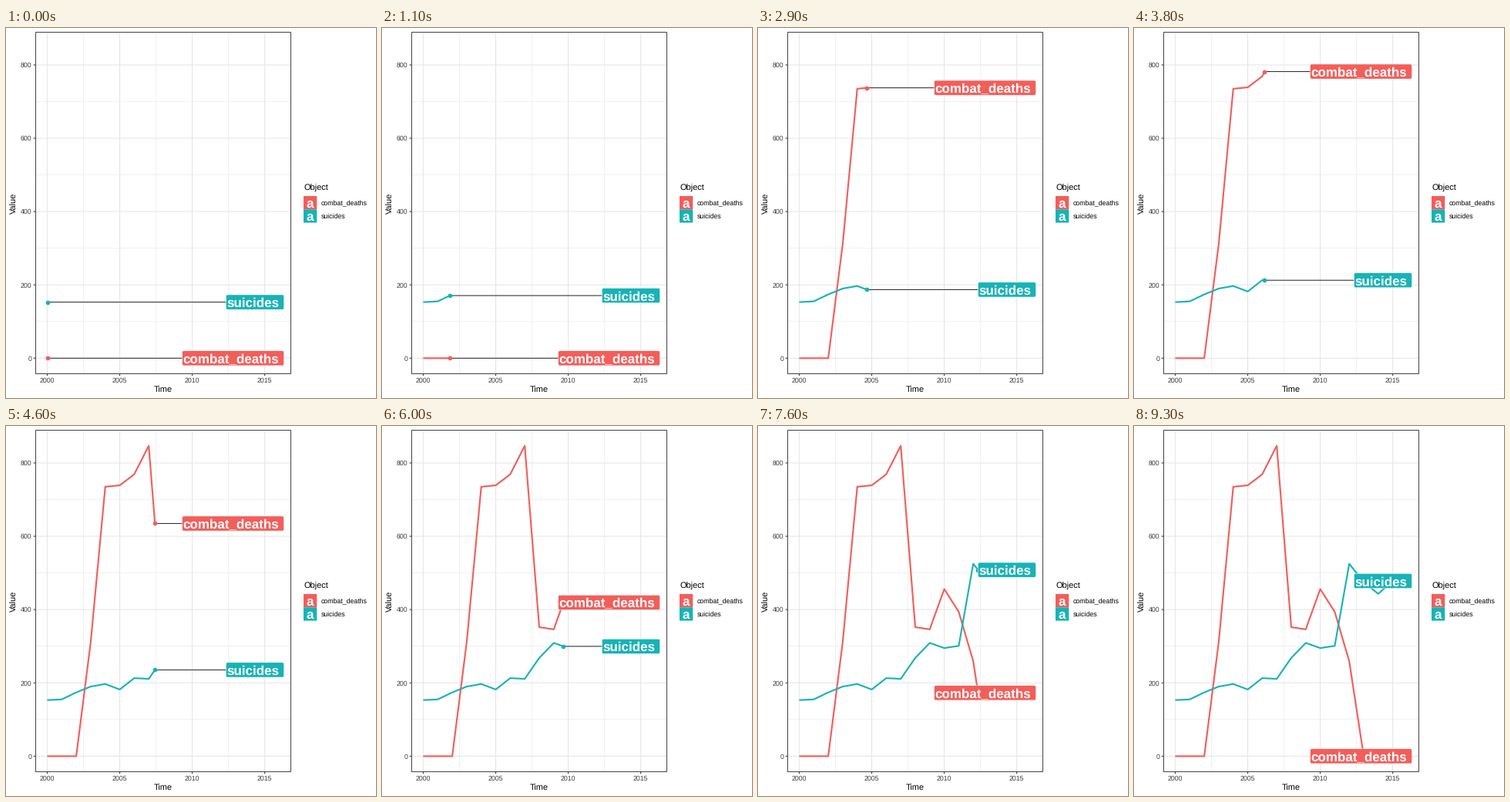
Write a matplotlib script that moves like this. It is 480 px wide and 480 px high and loops after 9.4 s.

```python
import numpy as np
import matplotlib.pyplot as plt
from matplotlib.animation import FuncAnimation
from matplotlib.patches import FancyBboxPatch, Rectangle

plt.rcParams["font.family"] = "Liberation Sans"
plt.rcParams["text.hinting"] = "none"

SIZE, DPI = 480, 100
PT = 72 / DPI  # points per pixel
FRAMES, INTERVAL = 94, 100

RED, TEAL = "#F35E5A", "#17B3B7"
GRID, DARK, TICK_TEXT = "#E6E6E6", "#333333", "#3C3C3C"
LEFT, RIGHT, TOP, BOTTOM = 38.5, 369.5, 5.5, 448.5
LABEL_RIGHT, LABEL_HALF = 360.6, 9.6

# frame on which each year 2000..2015 is reached
KEYS = [0, 6, 12, 19, 25, 31, 37, 43, 50, 56, 62, 68, 74, 80, 87, 93]
COMBAT = [0, 0, 0, 312, 735, 739, 769, 847, 352, 346, 456, 394, 259, 0, 0, 0]
SUICIDES = [153, 155, 174, 190, 197, 182, 213, 211,
            268, 309, 295, 301, 525, 475, 443, 478]
YEARS = np.arange(16)


def px(year):
    """Years since 2000 to pixels."""
    return 53.5 + 18.81 * np.asarray(year)


def py(value):
    return 428.36 - 0.4755 * np.asarray(value)


fig = plt.figure(figsize=(SIZE / DPI, SIZE / DPI), dpi=DPI, facecolor="white")
ax = fig.add_axes([0, 0, 1, 1])
ax.set_xlim(0, SIZE)
ax.set_ylim(SIZE, 0)
ax.axis("off")


def line(xs, ys, color, width, z):
    return ax.plot(xs, ys, color=color, lw=width * PT, zorder=z, snap=False,
                   solid_capstyle="butt", solid_joinstyle="round")[0]


def text(x, y, s, size, color="black", z=9, **kw):
    return ax.text(x, y, s, fontsize=size * PT, color=color, zorder=z,
                   va="baseline", **kw)


def draw_panel():
    for year in (2.5, 7.5, 12.5):
        line([px(year)] * 2, [TOP, BOTTOM], GRID, 0.53, 1)
    for value in (100, 300, 500, 700):
        line([LEFT, RIGHT], [py(value)] * 2, GRID, 0.53, 1)
    for year in (0, 5, 10, 15):
        x = px(year)
        line([x, x], [TOP, BOTTOM], GRID, 1.07, 1.5)
        line([x, x], [BOTTOM, BOTTOM + 2.75], DARK, 1.07, 8)
        text(x, 460, str(2000 + year), 8.8, TICK_TEXT, ha="center")
    for value in range(0, 801, 200):
        y = py(value)
        line([LEFT, RIGHT], [y, y], GRID, 1.07, 1.5)
        line([LEFT - 2.75, LEFT], [y, y], DARK, 1.07, 8)
        text(33.2, y + 3.2, str(value), 8.8, TICK_TEXT, ha="right")
    ax.add_patch(Rectangle((LEFT, TOP), RIGHT - LEFT, BOTTOM - TOP, fill=False,
                           ec="#4A4A4A", lw=1.07 * PT, zorder=8, snap=False))
    text(204, 473, "Time", 11, ha="center")
    text(13.5, 227.5, "Value", 11, ha="right", rotation=90,
         rotation_mode="anchor").set_ha("center")


def draw_legend():
    text(386, 211, "Object", 11)
    for i, (name, color) in enumerate((("combat_deaths", RED),
                                       ("suicides", TEAL))):
        y = 218 + 17.28 * i
        ax.add_patch(Rectangle((386, y), 17.28, 17.28, fc=color, ec="none",
                               zorder=8, snap=False))
        text(394.7, y + 15, "a", 17.07, "white", weight="bold", ha="center")
        text(408.6, y + 12, name, 8.8)


class Series:
    def __init__(self, name, values, color, left, order):
        self.values = values
        self.path = line([], [], color, 2.13, 2 + order)
        self.leader = line([], [], "#303030", 1.07, 3 + order)
        self.dot = ax.plot([], [], "o", ms=5.7 * PT, mfc=color, mec="none",
                           zorder=4 + order, snap=False)[0]
        self.box = FancyBboxPatch(
            (left, 0), LABEL_RIGHT - left, 2 * LABEL_HALF,
            boxstyle="round,pad=0,rounding_size=2", fc=color, ec="white",
            lw=0.53 * PT, zorder=5 + order, snap=False)
        ax.add_patch(self.box)
        self.label = text(left + 0.9, 0, name, 17.07, "white", 5.05 + order,
                          weight="bold")

    def update(self, now):
        past = YEARS[YEARS < now]
        value = np.interp(now, YEARS, self.values)
        x, y = px(now), py(value)
        self.path.set_data(np.append(px(past), x),
                           np.append(py(self.values)[:len(past)], y))
        self.leader.set_data([x, max(x, 345)], [y, y])
        self.dot.set_data([x], [y])
        self.box.set_y(y - LABEL_HALF)
        self.label.set_y(y + 6.4)
        return [self.path, self.leader, self.dot, self.box, self.label]


draw_panel()
draw_legend()
series = [Series("combat_deaths", COMBAT, RED, 228.6, 0),
          Series("suicides", SUICIDES, TEAL, 285.4, 0.1)]


def update(frame):
    now = np.interp(frame, KEYS, YEARS)
    return [artist for s in series for artist in s.update(now)]


anim = FuncAnimation(fig, update, frames=FRAMES, interval=INTERVAL,
                     init_func=lambda: update(0), repeat=True, blit=False)
plt.show()
```
